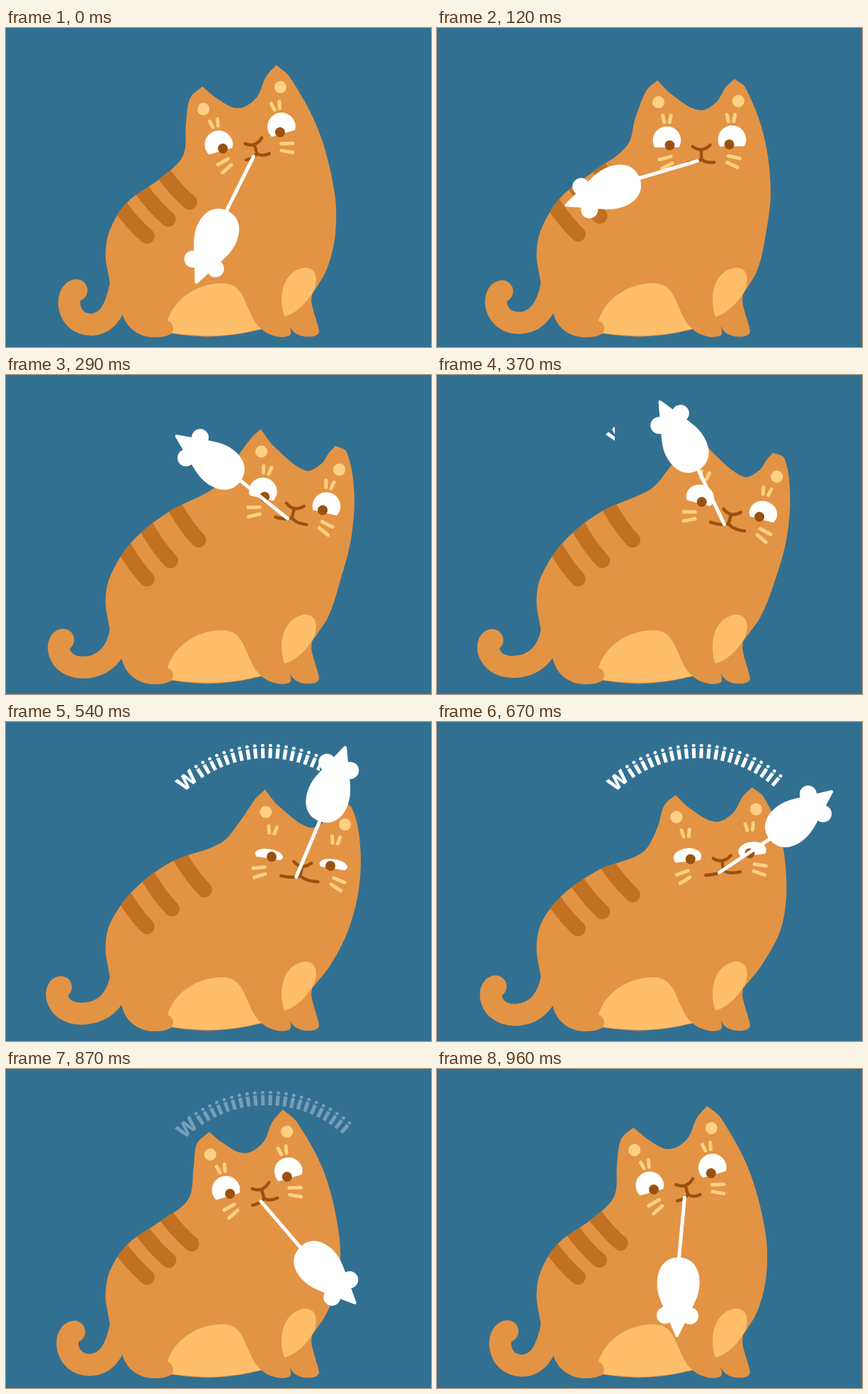
Recreate the animation shown at these times as an HTML page with a canvas. Size 600 px wide and 450 px high, loop 1000 ms.

```html
<!DOCTYPE html>
<html lang="en">
<head>
<meta charset="utf-8">
<title>Cat swinging a toy mouse</title>
<style>
html, body { margin: 0; height: 100%; overflow: hidden; background: #327092; }
canvas { display: block; }
</style>
</head>
<body>
<canvas id="stage" width="600" height="450"></canvas>
<script>
const ctx = document.getElementById('stage').getContext('2d');
const BG = '#327092', FUR = '#e39344', CREAM = '#febe6a', STRIPE = '#c27021';
const PALE = '#fed083', BROWN = '#9a5110', WHITE = '#fff';
const FRAMES = 24, RAD = Math.PI / 180;

// Face position, tilt and toy angle; everything else follows from these.
const REST = { x: 346.5, y: 158.5, tilt: -15.9 };
const keys = [
  { at: 0, ...REST, spin: 116.6 },
  { at: 5, x: 391.5, y: 172, tilt: 9.6, spin: 191.6 },
  { at: 9, x: 414.5, y: 189.5, tilt: 14.5, spin: 244.4 },
  { at: 13, x: 416.5, y: 196.5, tilt: 8.9, spin: 292.9 },
  { at: 18, x: 382, y: 181, tilt: -13.7, spin: 352 },
  { at: 21, x: 356.5, y: 164, tilt: -16.5, spin: 409.3 },
  { at: 23, ...REST, spin: 455.3 }
];

// Back line at rest: x, y, how far it follows the face, lift per degree of tilt.
const BACK = [[171, 246, .12, .45], [218, 212, .21, .78], [250, 180, .76, 1.13], [254, 135, 1.08, .82]];
// Ears in face space: x, y, and how both shift as the head turns.
const EARS = [
  [-72.5, -78.5, 1.65, -.7], [-56, -92, 3, 0], [-37, -71.5, 1.6, 0], [-1, -49, -1.5, 0],
  [24, -59, -.3, .9], [39, -80.5, 1.5, 0], [52.5, -92.5, 3, 0], [68, -78, 2.6, 2.2]
];
const LEGS = `L431,385 C433,400 441,418 442,428 C441,436 428,437 416,434 C408,432 403,426 400,420
  C403,428 404,434 397,435 C385,438 370,433 361,425 C340,430 315,435 285,435.5
  C265,435 250,433 234,431 C226,436 212,437 203,436 C182,433 168,419 164,402 C158,388 148,370 145,351Z`;
const BELLY = `M228,413 C236,385 265,361 305,360 C330,360 335,380 342,395
  C348,410 354,420 361,424.5 C340,429 325,432 305,433.5 C285,435 250,433 234,430 C238,424 236,416 228,413Z`;
const THIGH = 'M393,407 C385,385 387,345 420,338 C438,337 440,352 436,367 C430,381 413,402 393,407Z';
const TOY = `M0,0 C0,-20 16,-30 36,-30 C54,-30 66,-22 88,-12.5 L111,-2 Q114,0 111,2
  L88,12.5 C66,22 54,30 36,30 C16,30 0,20 0,0Z`;

// Smooth periodic interpolation that never overshoots a key.
function track(name, f, gain = 0) {
  const n = keys.length, i = keys.findLastIndex(k => k.at <= f);
  const read = (j, prop, wrap) => keys[(j + n) % n][prop] + wrap * Math.floor(j / n);
  const val = j => read(j, name, gain), time = j => read(j, 'at', FRAMES);
  const slope = j => (val(j + 1) - val(j)) / (time(j + 1) - time(j));
  const tangent = j => {
    const a = slope(j - 1), b = slope(j);
    return a * b <= 0 ? 0 : 2 * a * b / (a + b);
  };
  const span = time(i + 1) - time(i), u = (f - time(i)) / span;
  const p = val(i), d = val(i + 1) - p, m = tangent(i) * span, k = tangent(i + 1) * span;
  return p + u * (m + u * (3 * d - 2 * m - k + u * (m + k - 2 * d)));
}

// Bezier segments through a run of points.
function curve(pts) {
  const handle = (i, side, len) => {
    const a = pts[Math.max(i - 1, 0)], b = pts[Math.min(i + 1, pts.length - 1)];
    const s = side * len / 3 / Math.hypot(b[0] - a[0], b[1] - a[1]);
    return [pts[i][0] + (b[0] - a[0]) * s, pts[i][1] + (b[1] - a[1]) * s];
  };
  return pts.slice(1).map((p, i) => {
    const len = Math.hypot(p[0] - pts[i][0], p[1] - pts[i][1]);
    return `C${handle(i, 1, len)} ${handle(i + 1, -1, len)} ${p}`;
  }).join(' ');
}

function fill(path, color) {
  ctx.fillStyle = color;
  ctx.fill(new Path2D(path));
}

function stroke(path, color, width) {
  ctx.strokeStyle = color;
  ctx.lineWidth = width;
  ctx.stroke(new Path2D(path));
}

function dot(x, y, r, color) {
  ctx.fillStyle = color;
  ctx.beginPath();
  ctx.arc(x, y, r, 0, 7);
  ctx.fill();
}

function placed(x, y, angle, draw) {
  ctx.save();
  ctx.translate(x, y);
  ctx.rotate(angle * RAD);
  draw();
  ctx.restore();
}

function drawTail(k) {
  stroke(`M${99.5 - 22 * k},${370 + 4 * k} C${83 - 16 * k},${372 + 3 * k} ${84 - 16 * k},${418 - 7 * k}
    ${120 - 13 * k},${418.5 - 7 * k} C${146 - 8 * k},${418 - 7 * k} 156,392 162,362`, FUR, 31);
}

function drawBody(dx, dy, da, turn, toStage) {
  const hip = [[145, 351], [140.5, 319], [147, 284]];
  const back = BACK.map(([x, y, w, lift]) => [x + w * dx, y + .65 * w * dy - lift * da]);
  const ears = EARS.map(([x, y, kx, ky]) => toStage(x + kx * turn, y + ky * turn));
  const sway = .21 * dx + .52 * dy - .6 * da;
  const chest = [
    [441 + .8 * dx + .1 * da, 144 + .3 * dy + .5 * da],
    [463.5 + .35 * dx + .45 * dy - .25 * da, 230],
    [465 + sway, 290],
    [453 + .35 * sway, 340],
    [432, 376]
  ];
  const body = `M${hip[0]} ${curve([...hip, ...back, ...ears.slice(0, 2)])}
    ${curve(ears.slice(1, 7))} ${curve([...ears.slice(6), ...chest])} ${LEGS}`;
  fill(body, FUR);

  ctx.save();
  ctx.clip(new Path2D(body));
  for (let i = 0; i < 3; i++) {
    const x = 199 + 30 * i + .14 * i * i * dy;
    const y = 293.5 - 24 * i + .03 * i * i * dy - (.2 + .085 * i * i) * da;
    placed(x, y, .22 * da, () => stroke('M-54,-65 Q-26,-22 0,0', STRIPE, 21.5));
  }
  ctx.restore();
  fill(BELLY, CREAM);
  fill(THIGH, CREAM);
}

function drawFace(turn, spread, open) {
  for (const side of [-1, 1]) {
    const line = (x1, y1, x2, y2, shift) =>
      stroke(`M${side * x1 + shift},${y1} L${side * x2 + shift},${y2}`, PALE, 5);
    dot(side * 56.5 + turn, -61, 8.6, PALE);
    line(51, -42, 49, -32.5, turn / 2);
    line(39.5, -42, 41.5, -32.5, turn / 2);
    line(39, 16, 55, 20, side * spread);
    line(37, 25.5, 51.5, 32.5, side * spread);

    ctx.save();
    ctx.translate(side * 46, 3);
    ctx.scale(1, open);
    ctx.fillStyle = WHITE;
    ctx.beginPath();
    ctx.arc(0, -10, 19.8, 150 * RAD, 30 * RAD);
    ctx.fill();
    ctx.restore();
    dot(side * 42, 0, 7, BROWN);
  }
  stroke(`M-10,2 Q3,12 15,.5 M2.5,7 L2.3,20 M${-14.5 - spread},24.6 Q-4,25.5 2.3,20
    Q8,26.5 ${19 + spread * .9},24.8`, BROWN, 4.4);
}

// The cry is wiped in behind the toy, then fades.
function drawCry(f) {
  if (f < 9 || f >= 22) return;
  ctx.save();
  ctx.beginPath();
  ctx.rect(0, 0, 251 + 48 * (f - 9), 450);
  ctx.clip();
  ctx.globalAlpha = Math.min(1, (22 - f) / 3);
  ctx.textAlign = 'center';
  ctx.fillStyle = WHITE;
  const letter = (char, font, angle) => placed(368, 214, angle, () => {
    ctx.font = `${font} Inter, sans-serif`;
    ctx.fillText(char, 0, -163);
  });
  letter('W', '800 28px', -40.5);
  for (let i = 0; i < 22; i++) letter('i', '900 26px', -33.4 + 3.51 * i);
  ctx.restore();
}

function drawToy(x, y, angle) {
  placed(x, y, angle, () => {
    stroke('M0,0 L87,0', WHITE, 5);
    placed(85, 0, -3.8, () => {
      fill(TOY, WHITE);
      for (const side of [-1, 1]) dot(82, side * 17.5, 12, WHITE);
    });
  });
}

function draw(now) {
  const f = Math.floor((now % 1000 + 6) * FRAMES / 1000) % FRAMES;
  const x = track('x', f), y = track('y', f), tilt = track('tilt', f);
  const dx = x - REST.x, dy = y - REST.y, da = tilt - REST.tilt;
  const turn = -.9 - .27 * tilt;
  const open = 1 - .57 * Math.exp(-(((f - 13.6) / 3.6) ** 2));
  const c = Math.cos(tilt * RAD), s = Math.sin(tilt * RAD);
  const toStage = (px, py) => [x + px * c - py * s, y + px * s + py * c];

  ctx.fillStyle = BG;
  ctx.fillRect(0, 0, 600, 450);
  ctx.lineCap = ctx.lineJoin = 'round';
  drawTail(dx / 70);
  drawBody(dx, dy, da, turn, toStage);
  placed(x, y, tilt, () => drawFace(turn, .27 * dy, open));
  drawCry(f);
  drawToy(...toStage(-3.3, 22.7), track('spin', f, 360));
}

let start;
function tick(now) {
  start ??= now;
  draw(now - start);
  requestAnimationFrame(tick);
}
requestAnimationFrame(tick);
</script>
</body>
</html>
```
